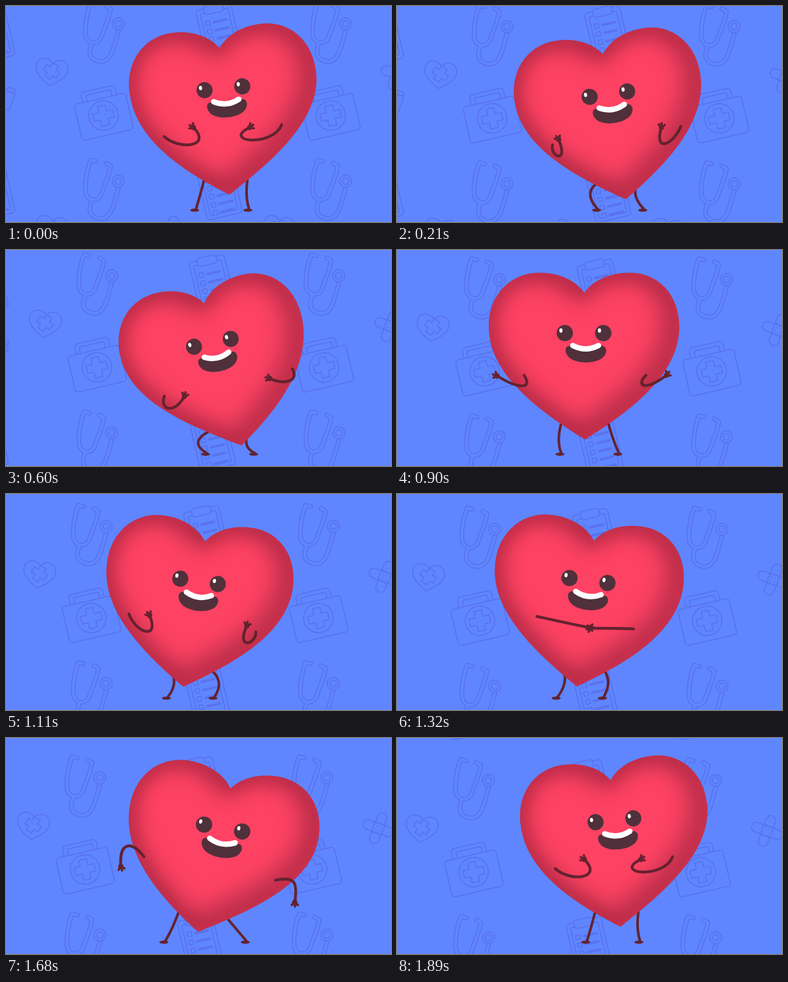
An HTML page with a canvas for the animation above (1.92 s loop, 600 by 338 pixels).

```html
<!DOCTYPE html>
<html lang="en">
<head>
<meta charset="utf-8">
<title>Dancing heart</title>
<style>
  html, body { margin: 0; width: 100%; height: 100%; overflow: hidden; background: #5f86ff; }
  canvas { display: block; width: 600px; height: 338px; }
</style>
</head>
<body>
<canvas id="stage" width="600" height="338"></canvas>
<script>
const ctx = document.getElementById('stage').getContext('2d');
const BG = '#5f86ff', LINE = '#5a73ec', LIMB = '#64222f', DARK = '#50303a';
const LOOP = 1920, DANCE = 1890, HALF = DANCE / 2, STEP = 30, AXIS = 316;

// Half a dance; the other half is its mirror image.
// body: notch x, y, lean in degrees, sway of the tip, width, shoulder distance
// arms: two curve handles and the hand; legs: knee handle and foot x
const half = [
  { t: 0, body: [333, 66, -5.8, -8, 0.985, 92],
    armL: [270, 226, 322, 220, 292, 190], armR: [415, 222, 335, 212, 380, 190],
    legL: [303, 295, 294], legR: [371, 295, 377] },
  { t: 210, body: [321, 75.5, -8.2, 3, 0.985, 101],
    armL: [238, 236, 268, 248, 252, 209], armR: [430, 218, 400, 230, 412, 190],
    legL: [287, 290, 311], legR: [357, 290, 383] },
  { t: 375, body: [325, 73, -7.4, -3, 0.995, 76],
    armL: [284, 210, 307, 210, 330, 210], armR: [385, 198, 359, 204, 332, 209],
    legL: [294, 290, 312], legR: [359, 288, 384] },
  { t: 600, body: [309, 83.5, -12, 11, 0.975, 102],
    armL: [239, 250, 262, 258, 278, 229], armR: [458, 207, 430, 211, 411, 201],
    legL: [280, 298, 311], legR: [358, 303, 386] },
  { t: 735, body: [282, 79, -10.2, 10, 1.005, 104],
    armL: [182, 216, 177, 225, 182, 257], armR: [438, 158, 456, 165, 453, 201],
    legL: [274, 298, 259], legR: [370, 295, 386] },
  { t: 900, body: [292, 67, 0, 1, 1, 95],
    armL: [212, 218, 190, 218, 156, 197], armR: [372, 212, 385, 222, 420, 196],
    legL: [247, 295, 254], legR: [335, 295, 344] }
];
const flip = list => list.map((v, i) => i % 2 ? v : 2 * AXIS - v);
function mirrored({ t, body: [x, y, lean, sway, ...size], armL, armR, legL, legR }) {
  return {
    t: t + HALF, body: [2 * AXIS - x, y, -lean, -sway, ...size],
    armL: flip(armR), armR: flip(armL), legL: flip(legR), legR: flip(legL)
  };
}
const keys = [...half, ...half.map(mirrored)];

function keyAt(i) {
  const n = keys.length, turn = Math.floor(i / n), k = keys[i - turn * n];
  return { ...k, t: k.t + turn * DANCE };
}

// Smooth interpolation without overshoot
function glide(k, get, t) {
  const p = k.map(get);
  const s = [0, 1, 2].map(i => (p[i + 1] - p[i]) / (k[i + 1].t - k[i].t));
  const slope = (a, b) => a * b > 0 ? 2 * a * b / (a + b) : 0;
  const h = k[2].t - k[1].t, u = (t - k[1].t) / h, v = 1 - u;
  return p[1] * v * v * (1 + 2 * u) + p[2] * u * u * (3 - 2 * u)
    + h * u * v * (slope(s[0], s[1]) * v - slope(s[1], s[2]) * u);
}

function poseAt(t) {
  t %= DANCE;
  const i = keys.findLastIndex(k => k.t <= t);
  const near = [i - 1, i, i + 1, i + 2].map(keyAt);
  const pose = {};
  for (const part of ['body', 'armL', 'armR', 'legL', 'legR'])
    pose[part] = keys[0][part].map((_, j) => glide(near, k => k[part][j], t));
  return pose;
}

function stroke(path, color, width) {
  ctx.strokeStyle = color;
  ctx.lineWidth = width;
  ctx.stroke(path);
}
function fill(path, color) {
  ctx.fillStyle = color;
  ctx.fill(path);
}
function disc(x, y, rx, ry = rx) {
  const p = new Path2D();
  p.ellipse(x, y, rx, ry, 0, 0, 7);
  return p;
}
function box(x, y, w, h, r) {
  const p = new Path2D();
  p.roundRect(x, y, w, h, r);
  return p;
}
function at(x, y, deg, draw) {
  ctx.save();
  ctx.translate(x, y);
  ctx.rotate(deg * Math.PI / 180);
  draw();
  ctx.restore();
}
const outline = path => { fill(path, BG); stroke(path, LINE, 1.8); };
const plus = (a, b) => new Path2D(
  `M${-a} ${-b}H${a}V${-a}H${b}V${a}H${a}V${b}H${-a}V${a}H${-b}V${-a}H${-a}Z`);

const tubes = new Path2D('M-11 -43L-19 -45C-25 -30 -28 -10 -27 4C-26 20 -7 22 -2 8C3 -8 10 -20 12 -36L5 -40'
  + 'M-17 17C-23 33 -22 42 -8 46C14 52 17 22 24 0');
const smallHeart = new Path2D('M0 -13C-7 -24 -25 -21 -25 -6C-25 7 -9 16 0 22C9 16 25 7 25 -6C25 -21 7 -24 0 -13Z');

function stethoscope() {
  stroke(tubes, LINE, 7.5);
  stroke(tubes, BG, 4);
  outline(disc(24, -12, 9.5));
  outline(disc(24, -12, 5));
}
function kit() {
  outline(box(-27, -43, 54, 24, 6));
  outline(box(-20, -37, 40, 18, 3));
  outline(box(-41, -27, 82, 58, 5));
  outline(disc(0, 0, 23));
  outline(plus(6, 16));
}
function clipboard() {
  outline(box(-28, -42, 56, 84, 5));
  outline(box(-22, -35, 44, 71, 2));
  outline(box(-15, -45, 30, 13, 4));
  for (let y = -22; y < 32; y += 13) {
    outline(box(-17, y, 7, 7, 1));
    stroke(new Path2D(`M-4 ${y + 4}H16`), LINE, 4);
  }
}
function plasters() {
  for (const deg of [110, 20]) at(0, 0, deg, () => {
    outline(box(-25, -7.5, 50, 15, 7));
    outline(box(-8, -7.5, 16, 15, 0));
    for (const x of [-3, 3]) for (const y of [-3, 3]) fill(disc(x, y, 1), LINE);
  });
}
function badge() {
  outline(smallHeart);
  at(0, -1, 25, () => outline(plus(5, 12)));
}
function bottle() {
  outline(box(-8, -12, 16, 28, 4));
  outline(box(-6, -18, 12, 6, 2));
}

function background(t) {
  ctx.fillStyle = BG;
  ctx.fillRect(0, 0, 600, 338);
  const dx = -32.5 * t / DANCE, dy = 38.5 * t / DANCE;
  for (let i = -1; i < 3; i++) for (let j = -1; j < 2; j++) {
    const put = (x, y, deg, draw) => at(x + dx + 354 * i, y + dy + 246 * j, deg, draw);
    put(151, 40, 0, stethoscope);
    put(152, 171.5, -13, kit);
    put(71, 103, 8, badge);
    put(255, 107, 0, plasters);
    put(332, 42, -13, clipboard);
    put(3, 146, 20, bottle);
  }
}

function leg([hx, hy], [kx, ky, fx]) {
  stroke(new Path2D(`M${hx} ${hy}Q${kx} ${ky} ${fx + 2} 318`), LIMB, 4);
  fill(disc(fx, 319.5, 7, 2.6), LIMB);
}

function arm([sx, sy], [ax, ay, bx, by, x, y]) {
  stroke(new Path2D(`M${sx} ${sy}C${ax} ${ay} ${bx} ${by} ${x} ${y}`), LIMB, 4.4);
  at(x, y, Math.atan2(y - by, x - bx) * 180 / Math.PI, () => {
    fill(disc(0, 0, 4.2), LIMB);
    stroke(new Path2D('M0 0L3.5 -5.5M0 0L6.5 -1.5M0 0L5 4'), LIMB, 3.6);
  });
}

function heart(tip) {
  const shape = new Path2D('M0 0C-14 -20 -40 -31.5 -70 -31.5C-115 -31.5 -149 3 -149 53'
    + `C-149 130 ${-67 + tip} 187 ${tip - 2} 228.5Q${tip} 230.5 ${tip + 2} 228.5`
    + `C${67 + tip} 187 148 130 148 53C148 3 115 -31.5 71 -31.5C40 -31.5 14 -20 0 0Z`);
  ctx.save();
  ctx.clip(shape);
  fill(shape, '#fd4263');
  ctx.filter = 'blur(12px)';
  stroke(shape, 'rgba(190,40,62,.6)', 20);
  ctx.filter = 'blur(18px)';
  ctx.translate(-11, -6);
  stroke(shape, 'rgba(130,30,55,.6)', 30);
  ctx.restore();
}

const mouth = new Path2D('M-22 83Q2 92 26 83C34 82 36 91 32 97C24 113 -19 113 -27 97C-31 91 -30 82 -22 83Z');
const teeth = new Path2D('M-18 82.5Q2 93 22 82.5');
function face() {
  for (const x of [-30.5, 29.5]) {
    fill(disc(x, 63, 12.7), DARK);
    fill(disc(x - 6, 59, 2.5, 3.4), '#fff');
  }
  fill(mouth, DARK);
  stroke(teeth, '#fff', 8.5);
}

function dancer(t) {
  const { body: [x, y, lean, tip, width, shoulder], armL, armR, legL, legR } = poseAt(t);
  const c = Math.cos(lean * Math.PI / 180), s = Math.sin(lean * Math.PI / 180);
  const joint = (px, py) => [x + (px + tip) * c - py * s, y + (px + tip) * s + py * c];
  leg(joint(-34, 195), legL);
  leg(joint(34, 195), legR);
  at(x, y, lean, () => {
    ctx.scale(width, 1);
    heart(tip);
    face();
  });
  arm(joint(-shoulder, 129), armL);
  arm(joint(shoulder, 129), armR);
}

ctx.lineCap = ctx.lineJoin = 'round';
function frame() {
  const t = Math.floor(performance.now() % LOOP / STEP) * STEP;
  background(t);
  dancer(t);
  requestAnimationFrame(frame);
}
frame();
</script>
</body>
</html>
```
